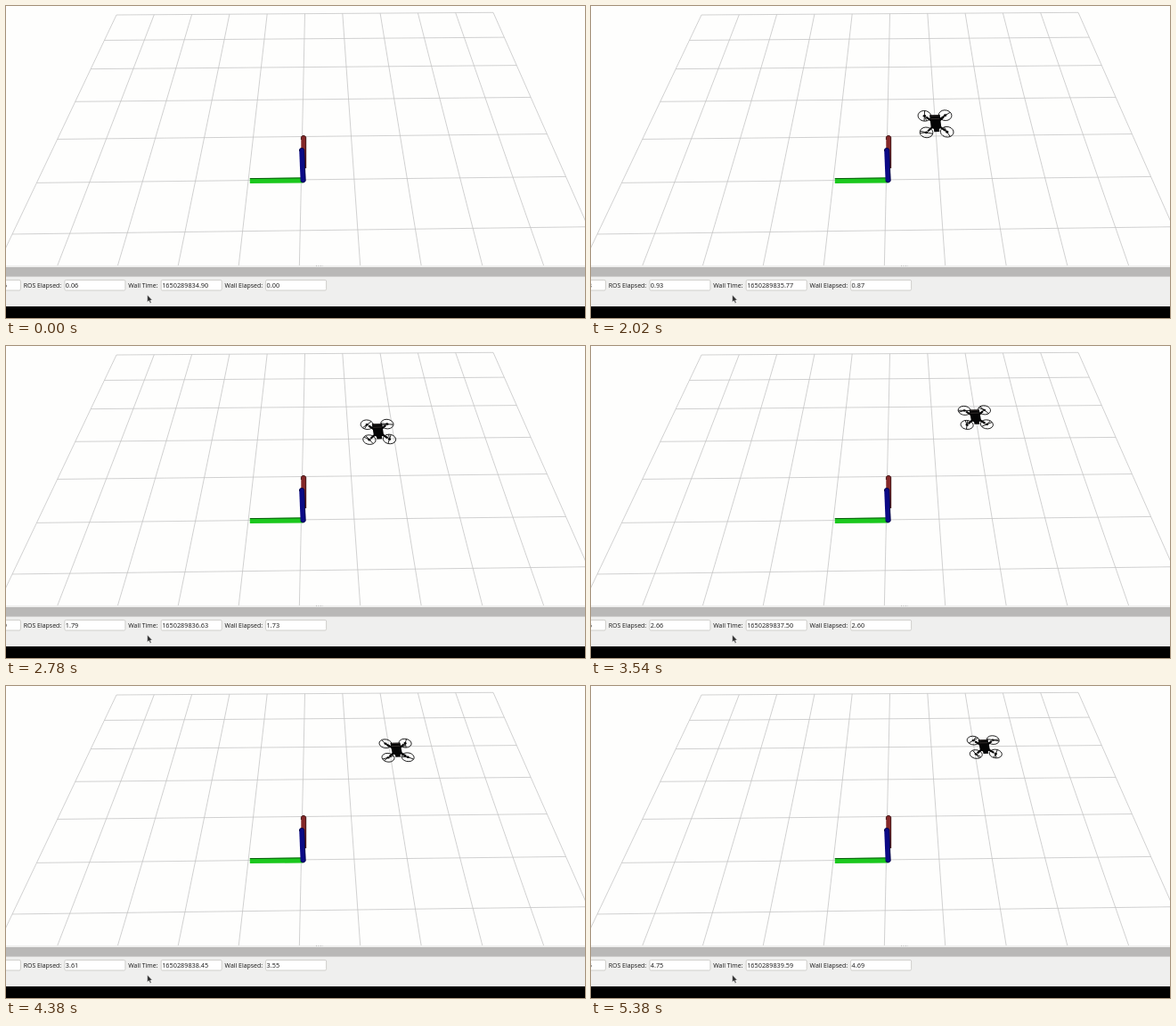
An HTML page that plays this animation: 650 px wide and 350 px high, repeating every 5.42 s.

```html
<!DOCTYPE html>
<html lang="en">
<head>
<meta charset="utf-8">
<title>Quadrotor flight</title>
<style>
  html, body { margin: 0; width: 650px; height: 350px; overflow: hidden; background: #fefefd; }
  svg { display: block; }
  text { font-family: "Open Sans", "Noto Sans", sans-serif; fill: #161616; }
  .label { font-size: 6.95px; }
  .value { font-size: 7.3px; }
  .field { fill: #fff; stroke: #c6c4c1; stroke-width: .8; }
  #grid { fill: none; stroke: #c2c2c2; stroke-width: .75; }
  #drone path, #drone circle { vector-effect: non-scaling-stroke; }
  .line { fill: none; stroke: #080808; stroke-width: .9; }
  .arm { fill: none; stroke: #080808; stroke-width: 2.2; }
</style>
</head>
<body>
<svg width="650" height="350" viewBox="0 0 650 350">
  <path id="grid"/>

  <g id="axes">
    <path d="M331.3 148Q331.4 145.4 334 145.2Q336.7 145.4 336.9 148V182H331.3Z" fill="#842829"/>
    <path d="M336.7 147V182M331.4 150V147Q332 145.6 334 145.4Q336 145.6 336.6 147" fill="none" stroke="#3a1010" stroke-width=".9"/>
    <path d="M273.8 193.3L333 192.6V198.4L273.8 199.1Z" fill="#1bc81e"/>
    <path d="M273.8 193.6L333 192.9" stroke="#0b5c0e" stroke-width="1"/>
  </g>

  <g id="drone" visibility="hidden">
    <path class="arm" d="M-.85 -.85L.85 .85M.85 -.85L-.85 .85"/>
    <g id="rotors"></g>
    <path d="M-.5 -1.1H.5V.45L.28 .62V.95H-.24V.62L-.5 .45Z" fill="#050505"/>
    <path d="M-.42 -.62H.42M-.38 -1H.38" fill="none" stroke="#524845" stroke-width=".6"/>
  </g>

  <path d="M329.2 161.5Q329.4 159.2 332 159Q334.6 159.2 334.9 161.5L336.4 196Q335.8 198 333.6 198.2Q331 198 330.6 196Z" fill="#0b0a86"/>
  <path d="M334.8 161L336.1 196.2Q335.4 197.8 333.6 197.9Q331.4 197.8 330.9 196M329.6 163V161Q330.4 159.5 332 159.4Q334 159.5 334.6 161" fill="none" stroke="#05053c" stroke-width=".9"/>

  <rect y="291" width="650" height="46" fill="#efefee"/>
  <path d="M348 291.6H356" stroke="#bbb" stroke-dasharray="1 1.5"/>
  <rect y="293" width="650" height="10.6" fill="#b9b8b7"/>
  <rect y="337" width="650" height="13"/>

  <rect class="field" x="-51.6" y="307.4" width="68" height="11.6" rx="1.5"/>
  <rect class="field" x="65.9" y="307.4" width="68" height="11.6" rx="1.5"/>
  <rect class="field" x="174.2" y="307.4" width="68" height="11.6" rx="1.5"/>
  <rect class="field" x="291.6" y="307.4" width="68" height="11.6" rx="1.5"/>
  <text class="label" x="19.8" y="316">ROS Elapsed:</text>
  <text class="label" x="137.3" y="316">Wall Time:</text>
  <text class="label" x="245.6" y="316">Wall Elapsed:</text>
  <text class="value" id="rosTime" x=".8" y="316" text-anchor="end"></text>
  <text class="value" id="ros" x="66.8" y="316"></text>
  <text class="value" id="wall" x="175.2" y="316"></text>
  <text class="value" id="elapsed" x="292.6" y="316"></text>

  <path d="M158.6 324V332.2L160.5 330.6L161.8 333.4L163.2 332.8L161.9 330.1H164.3Z" fill="#303030" stroke="#fff" stroke-width=".5"/>
</svg>
<script>
const LOOP = 5420, STEP = 40, TAKEOFF = 1580;
const $ = id => document.getElementById(id);
const mix = (a, b, u) => a + (b - a) * u;

// Ground plane: u runs across from 0 to 1, k counts rows towards the viewer
function ground(u, k) {
  const depth = 1 - .0576 * k;
  return [(124 + 423 * u - 19.9 * k) / depth, (mix(10, 7.3, u) + mix(26.25, 25.8, u) * k) / depth];
}
const segment = (a, b) => `M${a}L${b}`;
let grid = "";
for (let k = 0; k < 7; k++) grid += segment(ground(0, k), ground(1, k));
for (let i = 0; i <= 10; i++) grid += segment(ground(i / 10, 0), ground(i / 10, 7));
$("grid").setAttribute("d", grid);

// Rotors sit at the corners of a unit square
for (const y of [-1, 1]) for (const x of [-1, 1]) {
  $("rotors").innerHTML += `<g transform="translate(${x} ${y})">
    <circle class="line" r=".63"/><circle r=".15"/>
    <path class="line blade" d="M-.6 -.12L0 0L-.6 .12M0 0L.6 .1"/></g>`;
}
const blades = document.querySelectorAll(".blade");

function setClocks(ros, wall, elapsed) {
  $("ros").textContent = $("rosTime").textContent = ros.toFixed(2);
  $("wall").textContent = "16502898" + wall.toFixed(2);
  $("elapsed").textContent = elapsed.toFixed(2);
}

function draw(t) {
  const s = (t - TAKEOFF) / 1000, flying = s >= 0;
  $("drone").setAttribute("visibility", flying ? "visible" : "hidden");
  if (!flying) return setClocks(.06, 34.9, 0);

  const far = Math.exp(-1.03 * s); // approach to the goal
  const kick = Math.exp(-8 * s);   // take-off tilt and simulator lag
  const wall = 35.25 + 1.135 * s;
  setClocks(wall - 34.84 - .28 * kick, wall - .01 * kick, wall - 34.9 + .08 * kick);

  const left = 90 * far + 16.5 * kick;
  const side = [22 + 2 * far - 2 * kick, -.5 - .6 * far + 9 * kick];
  const back = [3.1 - 1.6 * far, 15.3 + 5.5 * far - 5.8 * kick];
  const axes = [...side, ...back].map(v => v / 2);
  $("drone").setAttribute("transform", `matrix(${axes} ${443.5 - left} ${66.5 + 1.165 * left})`);
  blades.forEach((b, i) => b.setAttribute("transform", `rotate(${t / STEP * 97 + i * 50})`));
}

function tick(now) {
  draw(Math.round(now / STEP) * STEP % LOOP);
  requestAnimationFrame(tick);
}
tick(performance.now());
</script>
</body>
</html>
```
